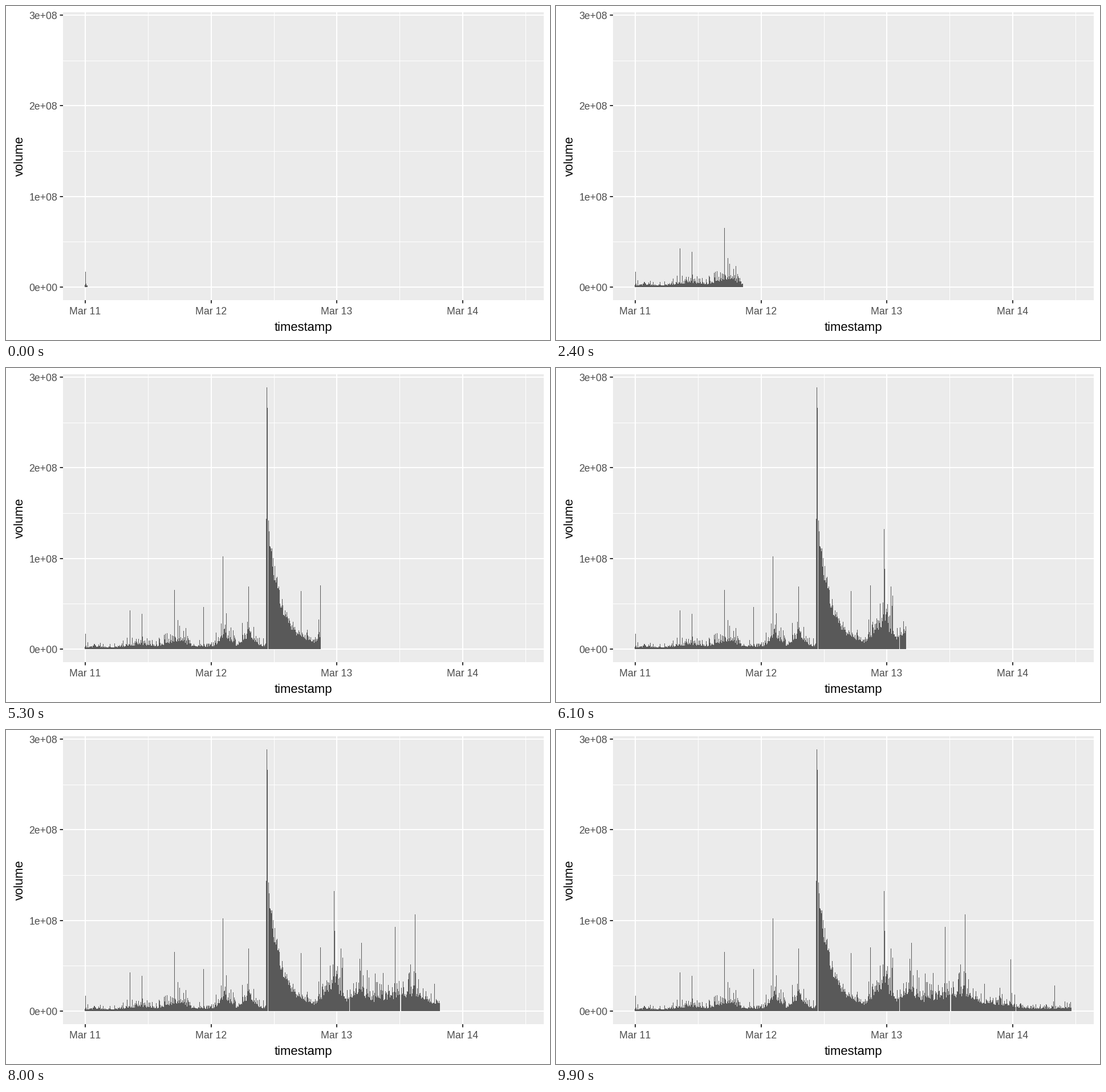
A matplotlib script for the animation above (10000 ms loop, 954 px wide and 587 px high).

```python
import matplotlib.pyplot as plt
import numpy as np
from matplotlib.animation import FuncAnimation
from matplotlib.patches import Rectangle

# 72 dpi makes one point equal one pixel
W, H, DPI = 954, 587, 72
FRAMES, INTERVAL = 100, 100
LEFT, RIGHT, TOP, BOTTOM = 100, 943, 11, 517
X0, DAY = 139, 220.6
Y0, UNIT = 494, 159.3
FIRST, LAST = 138, 904
CRASH = 456

# Typical volume through the days, in pixels: (x, height)
LEVEL = [
    (138, 6), (185, 5), (235, 13), (265, 9), (305, 26), (328, 7), (366, 9),
    (380, 42), (405, 9), (425, 42), (446, 10), (541, 12), (576, 72),
    (600, 28), (620, 68), (636, 28), (670, 38), (718, 52), (745, 26),
    (800, 15), (830, 7), (904, 9),
]
# Outstanding single bars: (x, height)
PEAKS = [
    (139, 27), (217, 68), (238, 62), (295, 104), (346, 74), (380, 163),
    (425, 110), (457, 460), (458, 424), (517, 102), (551, 112), (575, 211),
    (682, 148), (717, 170), (797, 91), (874, 45),
]
GAPS = [459, 602, 691, 692, 806]

plt.rcParams["font.family"] = "Liberation Sans"
plt.rcParams["text.kerning_factor"] = 6


def make_heights():
    rng = np.random.default_rng(11)
    x = np.arange(FIRST, LAST)
    level = np.interp(x, *zip(*LEVEL))
    # A sudden sell-off that dies away exponentially
    surge = np.where(x < CRASH, 0, 250 * np.exp((CRASH - x) / 22))
    bursts = np.minimum(rng.exponential(size=x.size), 4)
    heights = level * (0.5 + 0.4 * bursts)
    heights += surge * rng.uniform(0.8, 1.1, x.size)
    for px, h in PEAKS:
        heights[px - FIRST] = h
    heights[np.array(GAPS) - FIRST] = 0
    return np.round(heights)


fig = plt.figure(figsize=(W / DPI, H / DPI), dpi=DPI, facecolor="white")
ax = fig.add_axes([0, 0, 1, 1])
ax.axis("off")


def crisp(v, width):
    """Centre a line so that it fills whole pixels."""
    return round(v) + width % 2 / 2


def vline(x, y1, y2, color="white", width=2):
    x = crisp(x, width)
    ax.plot([x, x], [y1, y2], color=color, lw=width, snap=False,
            solid_capstyle="butt", zorder=1)


def hline(y, x1, x2, color="white", width=2):
    y = crisp(y, width)
    ax.plot([x1, x2], [y, y], color=color, lw=width, snap=False,
            solid_capstyle="butt", zorder=1)


def label(x, y, text, size, color, ha="center", **kw):
    ax.text(x, y, text, fontsize=size, color=color, ha=ha, va="baseline", **kw)


ax.add_patch(Rectangle((LEFT, TOP), RIGHT - LEFT, BOTTOM - TOP,
                       fc="#EBEBEB", lw=0, zorder=0))

for i in range(4):
    vline(X0 + DAY * (i + 0.5), TOP, BOTTOM, width=1)
for i in range(3):
    hline(Y0 - UNIT * (i + 0.5), LEFT, RIGHT, width=1)
for i in range(4):
    x, y = X0 + DAY * i, Y0 - UNIT * i
    vline(x, TOP, BOTTOM)
    hline(y, LEFT, RIGHT)
    vline(x, BOTTOM, BOTTOM + 5.5, "#333333")
    hline(y, LEFT - 5.5, LEFT, "#333333")
    label(x - 0.5, 542, f"Mar {11 + i}", 17.6, "#4D4D4D")
    label(90, y + 7, f"{i}e+0{8 if i else 0}", 17.6, "#4D4D4D", ha="right")

label(521.5, 571.5, "timestamp", 22, "black")
label(29.5, 263.5, "volume", 22, "black", rotation=90, rotation_mode="anchor")

edges = np.arange(FIRST, LAST + 1)
tops = Y0 - make_heights()
bars = ax.stairs(np.full(tops.size, Y0), edges, baseline=Y0, fill=True,
                 color="#595959", lw=0, antialiased=False, zorder=2)
ax.set_xlim(0, W)
ax.set_ylim(H, 0)


def update(frame):
    end = min(LAST, 143 + 85 * frame // 11)
    bars.set_data(values=np.where(edges[:-1] < end, tops, Y0))
    return [bars]


anim = FuncAnimation(fig, update, frames=FRAMES, interval=INTERVAL,
                     repeat=True, repeat_delay=0)
plt.show()
```
